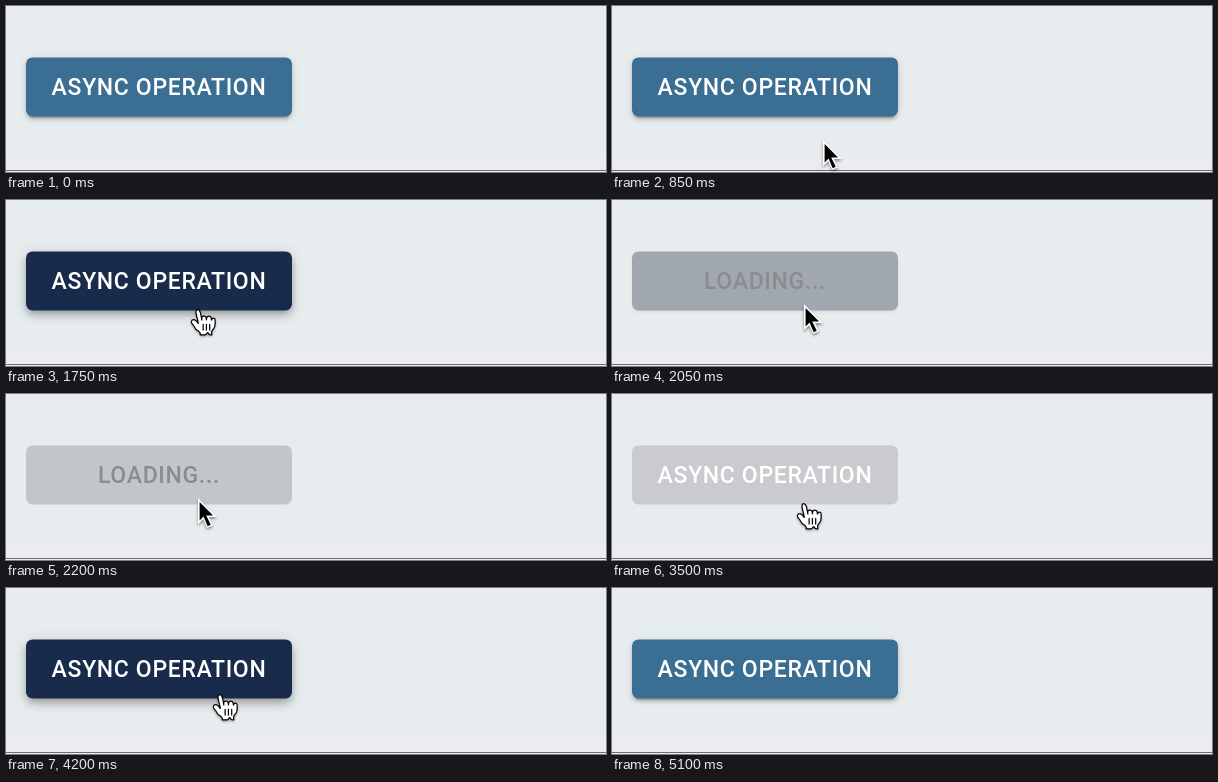
Write an HTML page with a canvas that moves like this. It is 600 px wide and 166 px high and loops after 5550 ms.

```html
<!DOCTYPE html>
<html lang="en">
<head>
<meta charset="utf-8">
<title>Async button</title>
<style>
  html, body { margin: 0; width: 100%; height: 100%; overflow: hidden; background: #e7ecef; }
  canvas { display: block; width: 600px; height: 166px; }
</style>
</head>
<body>
<canvas id="stage" width="600" height="166"></canvas>
<script>
const ctx = document.getElementById('stage').getContext('2d');
const LOOP = 5550, STEP = 50, ZOOM = 1.643;
const BTN = { x: 20, y: 51.4, w: 266, h: 59, r: 6.5 };

// Each shadow layer: offset y, blur, spread, alpha
const NONE = [[0, 0, 0, 0], [0, 0, 0, 0], [0, 0, 0, 0]];
const LOW  = [[3, 1, -2, .2], [2, 2, 0, .14], [1, 5, 0, .12]];
const MID  = [[2, 4, -1, .2], [4, 5, 0, .14], [1, 10, 0, .12]];
const HIGH = [[5, 5, -3, .2], [8, 10, 1, .14], [3, 14, 2, .12]];

const DARK = [24, 43, 74];
const REST = { color: [59, 110, 147], shadow: LOW };
const HOVER = { color: DARK, shadow: MID };
const PRESS = { color: DARK, shadow: HIGH };
const BUSY = { color: [194, 198, 200], shadow: NONE };
const READY = { color: [202, 203, 206], shadow: NONE };

// start, duration, state
const CHANGES = [
  [1215, 250, HOVER], [1830, 250, PRESS], [1920, 250, BUSY],
  [3500, 0, READY], [3500, 280, HOVER], [4240, 250, REST]
];

// time, x, y of the pointer
const PATH = [
  [640, 238, 162], [850, 212, 138], [1100, 196, 119], [1240, 193, 108],
  [4080, 193, 108], [4200, 215, 105], [4250, 292, 77], [4300, 454, 40]
];

const HAND = new Path2D('M11.3 20.4c-.3-.4-.6-1.1-1.2-2-.3-.5-1.2-1.5-1.5-1.9-.2-.4-.2-.6-.1-1 ' +
  '.1-.6.7-1.1 1.4-1.1.5 0 1 .4 1.4.7.2.2.5.6.7.8.2.2.2.3.4.5.2.3.3.5.2.1-.1-.5-.2-1.3-.4-2.1' +
  '-.3-1.1-.4-1.6-.6-2.4-.1-.3-.2-1.1-.3-1.5-.1-.5-.1-1.4.3-1.8.3-.3.9-.4 1.3-.2.5.3.8 1 .9 1.3' +
  '.2.5.4 1.2.5 2 .2 1 .5 2.5.5 2.8 0-.4-.1-1.1 0-1.5.1-.3.3-.7.7-.8.3-.1.6-.1.9-.1.3.1.6.3.8.5' +
  '.4.6.4 1.9.4 1.8.1-.4.1-1.2.3-1.6.1-.2.5-.4.7-.5.3-.1.7-.1 1 0 .2 0 .6.3.7.5.2.3.3 1.3.4 1.7' +
  ' 0 .1.1-.4.3-.7.4-.6 1.8-.8 1.9.6v1.9c0 .5-.1 1.6-.2 2.1-.1.3-.4 1-.7 1.4 0 0-1.1 1.2-1.2 1.8' +
  'v1c0 .4.1.9.1.9s-.8.1-1.2 0c-.4-.1-.9-.8-1-1.1-.2-.3-.5-.3-.7 0-.2.4-.7 1.1-1.1 1.1' +
  '-.7.1-2.1 0-3.1 0 0 0 .2-1-.2-1.4-.3-.3-.8-.8-1.1-1.1z');
const FINGERS = new Path2D('M19.6 20.7v-3.4M17.6 20.7v-3.5M15.6 17.3v3.4');
const ARROW_EDGE = new Path2D('M8.2 4.9L19.8 16.5H14.9L17.3 21.6L13.7 23.1L11.4 17.8L8.2 20.9z');
const ARROW = new Path2D('M9.2 7.3L17.4 15.5H13.2L16 21.2L14.1 22L11.6 16.2L9.2 18.5z');

const lerp = (a, b, p) => a + (b - a) * p;
const mix = (a, b, p) => a.map((v, i) => lerp(v, b[i], p));

// cubic-bezier(.4, 0, .2, 1)
function ease(x) {
  if (x <= 0) return 0;
  if (x >= 1) return 1;
  let lo = 0, hi = 1;
  for (let i = 0; i < 20; i++) {
    const s = (lo + hi) / 2, q = 1 - s;
    if (1.2 * q * q * s + .6 * q * s * s + s * s * s < x) lo = s; else hi = s;
  }
  return lo * lo * (3 - 2 * lo);
}

function buttonState(t) {
  let { color, shadow } = REST;
  for (const [start, dur, to] of CHANGES) {
    if (t < start) break;
    const p = dur ? ease((t - start) / dur) : 1;
    color = mix(color, to.color, p);
    shadow = shadow.map((layer, i) => mix(layer, to.shadow[i], p));
  }
  return { color, shadow };
}

function roundBox(dx, grow) {
  ctx.beginPath();
  ctx.roundRect(BTN.x + dx - grow, BTN.y - grow, BTN.w + 2 * grow, BTN.h + 2 * grow,
    Math.max(0, BTN.r + grow));
  ctx.fill();
}

function drawShadow([y, blur, spread, alpha]) {
  if (alpha < .001) return;
  const away = 2000;
  ctx.save();
  ctx.shadowColor = `rgba(0,0,0,${alpha})`;
  ctx.shadowBlur = blur * ZOOM;
  ctx.shadowOffsetX = away;
  ctx.shadowOffsetY = y * ZOOM;
  ctx.fillStyle = '#000';
  roundBox(-away, spread * ZOOM);
  ctx.restore();
}

function drawButton(t) {
  const { color, shadow } = buttonState(t);
  const busy = t >= 1920 && t < 3500;
  shadow.forEach(drawShadow);
  ctx.fillStyle = `rgb(${color.map(Math.round)})`;
  roundBox(0, 0);

  ctx.font = '500 23px Roboto, Arial, sans-serif';
  ctx.letterSpacing = '0.657px';
  ctx.textAlign = 'center';
  ctx.textBaseline = 'alphabetic';
  ctx.fillStyle = busy ? '#898d90' : '#fff';
  ctx.fillText(busy ? 'LOADING...' : 'ASYNC OPERATION', 153, 89);
}

function pointerAt(t) {
  const i = PATH.findIndex(k => k[0] > t);
  if (i < 1) return t === PATH[PATH.length - 1][0] ? PATH[PATH.length - 1] : null;
  const a = PATH[i - 1], b = PATH[i];
  return mix(a, b, (t - a[0]) / (b[0] - a[0]));
}

function castShadow(on) {
  ctx.shadowColor = on ? 'rgba(0,0,0,.45)' : 'transparent';
  ctx.shadowBlur = 3;
  ctx.shadowOffsetY = 1.6;
}

function drawPointer(t) {
  const at = pointerAt(t);
  if (!at) return;
  const hand = (t >= 1215 && t < 1920) || (t >= 3500 && t < 4240);
  ctx.save();
  ctx.translate(at[1] - (hand ? 21.5 : 14.5), at[2] - 12);
  ctx.scale(ZOOM, ZOOM);
  castShadow(true);
  ctx.fillStyle = '#fff';
  ctx.fill(hand ? HAND : ARROW_EDGE);
  castShadow(false);
  if (hand) {
    ctx.strokeStyle = '#000';
    ctx.lineWidth = .75;
    ctx.lineJoin = ctx.lineCap = 'round';
    ctx.stroke(HAND);
    ctx.stroke(FINGERS);
  } else {
    ctx.fillStyle = '#000';
    ctx.fill(ARROW);
  }
  ctx.restore();
}

function drawBackdrop() {
  ctx.fillStyle = '#e7ecef';
  ctx.fillRect(0, 0, 600, 166);
  ctx.fillStyle = '#ebecf0';
  ctx.fillRect(0, 149, 600, 17);
  ctx.fillStyle = '#6c6d73';
  ctx.fillRect(0, 164, 600, 1);
}

function draw(now) {
  const t = Math.floor(now % LOOP / STEP) * STEP;
  drawBackdrop();
  drawButton(t);
  drawPointer(t);
}

const begin = performance.now();
function tick() {
  draw(performance.now() - begin);
  requestAnimationFrame(tick);
}
tick();
</script>
</body>
</html>
```
